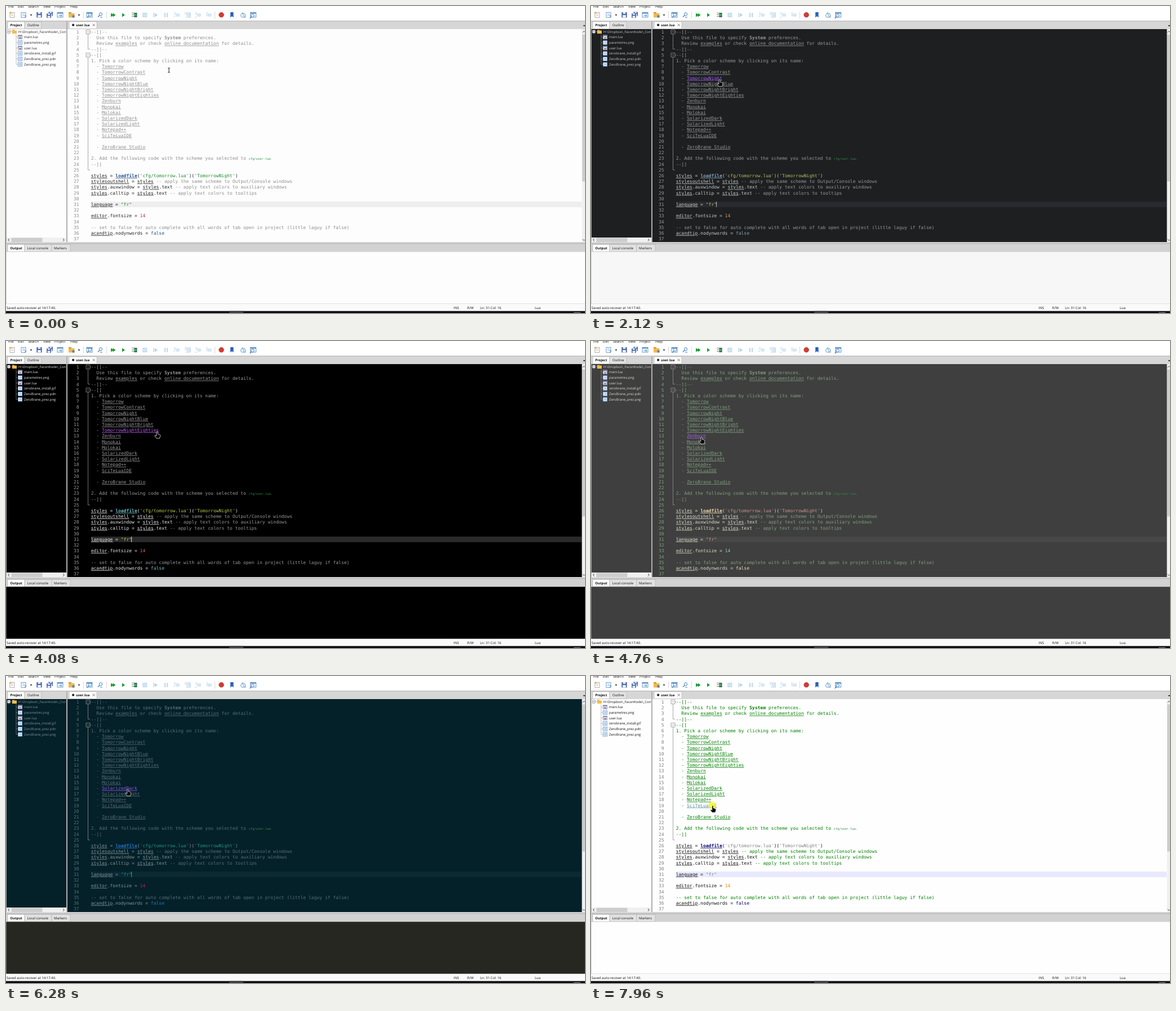
Animation of 1027x545 px, one loop 8000 ms. Source, as an HTML page:

```html
<!DOCTYPE html>
<html lang="en">
<head>
<meta charset="utf-8">
<title>Colour scheme picker</title>
<style>
  html, body { margin: 0; width: 100%; height: 100%; overflow: hidden; background: #fff; }
  svg { display: block; width: 1027px; height: 545px; }
  text { white-space: pre; text-rendering: geometricPrecision; }
  .ui text { font: 6px "Open Sans", "Noto Sans", sans-serif; fill: #111; }
  .ui .bold { font-weight: 700; }
  .pane { fill: var(--bg); }
  #editor text { font: 8.02px "DejaVu Sans Mono", "Noto Sans Mono", monospace; fill: var(--fg); }
  #editor .num { text-anchor: end; fill: var(--num); }
  #editor .com { fill: var(--comment); }
  .com .bold, .kw { font-weight: 700; }
  .link, .var, .kw { text-decoration: underline; text-decoration-thickness: .7px; }
  .kw, .bool { fill: var(--keyword); }
  .str { fill: var(--string); }
  .digit { fill: var(--number); }
  .small { font-size: 5.37px; }
  .path { fill: #2f8f3f; }
  #editor .link.hover { fill: var(--hover); }
  .current { fill: var(--line); }
  .fold { fill: none; stroke: #929292; stroke-width: .8; }
  #project text { fill: var(--fg); }
  #hand { fill: #000; stroke: #fff; stroke-width: .7; stroke-linejoin: round; }
  #beam { fill: none; stroke-width: .9; }
</style>
</head>
<body>
<svg viewBox="0 0 1027 545">
  <defs>
    <clipPath id="side"><rect x="1" y="41" width="106" height="370"/></clipPath>
  </defs>
  <rect width="1027" height="545" fill="#fff"/>
  <g id="chrome" class="ui"></g>
  <g id="project" class="ui"></g>
  <g id="editor"></g>
  <g id="output"><rect class="pane" x=".5" y="436.4" width="1026.5" height="92.1"/></g>
  <g id="bars"></g>
  <g id="pointer">
    <circle id="press" r="6.6" fill="#ff0" opacity=".68"/>
    <path id="hand" transform="translate(.9 .6)" d="M-1.2 .6Q0-.7 1.1.6V4.4L2.5 4.7 4.2 5.2 5.6 6.2V9.1L4.4 12.2H-1.1L-4 8.2Q-4.2 6.7-2.7 7L-1.2 8.1Z"/>
    <path id="beam" d="M-1.8-4H-.4L0-3.5.4-4H1.8M0-3.5V3.5M-1.8 4H-.4L0 3.5.4 4H1.8"/>
  </g>
</svg>
<script>
const LOOP = 8000, LEFT = 150.7, CHAR = 4.828, ROW = 10.2;
const $ = id => document.getElementById(id);
const baseline = row => 49 + (row - 1) * ROW;
const rect = (x, y, w, h, fill, more = '') => `<rect x="${x}" y="${y}" width="${w}" height="${h}" fill="${fill}" ${more}/>`;
const path = (d, stroke, fill = 'none', width = 1) => `<path d="${d}" stroke="${stroke}" fill="${fill}" stroke-width="${width}"/>`;
const text = (x, y, s, cls = '') => `<text x="${x}" y="${y}" class="${cls}">${s}</text>`;
const span = (cls, s) => `<tspan class="${cls}">${s}</tspan>`;

// bg, current line, foreground, comment, keyword, string, number, hovered link, line numbers
const fields = ['bg', 'line', 'fg', 'comment', 'keyword', 'string', 'number', 'hover', 'num'];
const schemes = {
  tomorrow: 'fdfdfd eeeeee 242424 8e908c 27518c 1e8c2c c82848 c080f8',
  contrast: 'f7f7f7 ebebeb 161616 8e908c 1f2f70 007f20 3a50c8 c080f8',
  night: '1d1f21 282a2e c5c8c6 969896 81a2be b5bd68 de935f a060f0',
  blue: '002451 003b76 ffffff 7285b7 bbeaff d1f1a9 ffc58f 704cf0',
  bright: '000000 2a2a2a eaeaea 969896 70c0c8 b9ca4a e0604f b65cf0',
  eighties: '2d2d2d 393939 cccccc 999999 99cccc 99cc99 f99157 b060f0',
  zenburn: '3f3f3f 484848 dcdccc 7f9f7f f0dfaf cc9393 8cd0d3 b060f0',
  monokai: '272822 2f302a f8f8f2 75715e 66d9ef e6db74 ae81ff a650d0',
  molokai: '262721 2f302a f8f8f2 7e8e91 66d9ef e6db74 ae81ff a650d0',
  solarDark: '042029 0a2933 839496 586e75 2176c7 259286 c61c6f 9050e0',
  solarLight: 'fdf5e0 ece5d2 465a61 8a9a98 24363c 259286 c61c6f c080f0',
  plain: 'fefefe e8e8ff 101010 008000 000070 808080 ff8000 5f8f9f 808080'
};
const switches = [
  [0, 'tomorrow'], [1000, 'contrast'], [2100, 'night'], [2830, 'blue'], [3380, 'bright'],
  [4160, 'eighties'], [4680, 'zenburn'], [5180, 'monokai'], [5735, 'molokai'],
  [6260, 'solarDark'], [6775, 'solarLight'], [7340, 'plain'], [8020, 'plain']
];
const panes = [['editor', 0], ['project', 20], ['output', 60]];
const moves = [
  [40, 289, 114], [340, 387, 136], [820, 243, 121], [1060, 243, 121], [1360, 245, 122],
  [1720, 227, 130], [2100, 227, 130], [2560, 249, 139], [2760, 250, 139], [2840, 253, 140],
  [3240, 255, 149], [3400, 255, 149], [3680, 277, 159], [3840, 267, 160], [4160, 267, 160],
  [4580, 195, 169], [4700, 195, 169], [5040, 197, 179], [5200, 197, 179], [5560, 193, 191],
  [5735, 193, 191], [6000, 215, 200], [6260, 215, 200], [6560, 227, 211], [6840, 227, 211],
  [7120, 205, 220], [7340, 205, 220], [7680, 215, 229.5]
];
const caretOn = [[130, 660], [1190, 1720], [2100, 2630], [3310, 3840], [4060, 4590],
  [5180, 5730], [5740, 6000], [6240, 6500], [6760, 7100], [7320, 7660]];

// _link_  *bold*  ~path~
const notes = `--[[--
  Use this file to specify *System* preferences.
  Review _examples_ or check _online documentation_ for details.
--]]--
--[[
1. Pick a color scheme by clicking on its name:
  - _Tomorrow_
  - _TomorrowContrast_
  - _TomorrowNight_
  - _TomorrowNightBlue_
  - _TomorrowNightBright_
  - _TomorrowNightEighties_
  - _Zenburn_
  - _Monokai_
  - _Molokai_
  - _SolarizedDark_
  - _SolarizedLight_
  - _Notepad++_
  - _SciTeLuaIDE_

  - _ZeroBrane Studio_

2. Add the following code with the scheme you selected to ~cfg/user.lua~
--]]
`.split('\n');
const code = `styles = loadfile('cfg/tomorrow.lua')('TomorrowNight')
stylesoutshell = styles -- apply the same scheme to Output/Console windows
styles.auxwindow = styles.text -- apply text colors to auxiliary windows
styles.calltip = styles.text -- apply text colors to tooltips

language = "fr"

editor.fontsize = 14

-- set to false for auto complete with all words of tab open in project (little laguy if false)
acandtip.nodynwords = false
`.split('\n');

const markNote = s => s
  .replace(/_([^_]+)_/g, (_, t) => span('link', t))
  .replace(/\*(.+)\*/, (_, t) => span('bold', t))
  .replace(/~(.+)~/, (_, t) => span('small path', t) + span('small', '.'));
const tokenClasses = ['com', 'str', 'kw', 'var', 'digit', 'bool'];
const markCode = s => s.replace(
  /(--.*)|('[^']*'|"[^"]*")|(loadfile)|\b(styles\w*|language|editor|acandtip)\b|(\d+)|(false)/g,
  (all, ...groups) => span(tokenClasses[groups.slice(0, 6).findIndex(Boolean)], all));

function drawEditor() {
  let out = '<rect class="pane" x="109" y="41" width="913" height="378"/>'
    + '<rect class="current" x="151" y="347.2" width="870" height="10"/>';
  [...notes, ...code].forEach((line, i) => {
    const y = baseline(i + 1).toFixed(2), isNote = i < notes.length;
    out += text(129.6, y, i + 1, 'num');
    if (line) out += text(LEFT, y, isNote ? markNote(line) : markCode(line), isNote ? 'com' : '');
  });
  const box = y => `M142 ${y - 3.5}h7v7h-7zM143.5 ${y}h4`;
  out += `<path class="fold" d="${box(46)}${box(87)}M145.5 49.5V76.5H149M145.5 90.5V291H149M149 46h2M149 87h2"/>`;
  out += '<rect id="caret" x="222.2" y="347.3" width=".9" height="9.8" style="fill:var(--fg)"/>';
  $('editor').innerHTML = out;
}

function drawProject() {
  const files = ['main.lua', 'parametres.png', 'user.lua', 'zerobrane_install.gif', 'ZeroBrane_prez.pdn', 'ZeroBrane_prez.png'];
  let out = '<rect class="pane" x="1" y="41" width="106" height="370"/><g clip-path="url(#side)">';
  out += path('M5 48V50M8 45.5h3M18 50V103.5', '#999', 'none', .6) + rect(2.5, 43, 5, 5, '#fff', 'stroke="#888" stroke-width=".7"');
  out += path('M3.7 45.5h2.6', '#333', 'none', .7);
  out += rect(11, 42.5, 4, 2, '#d99a2b') + rect(11, 43.5, 8, 5.5, '#f3bd4d');
  out += text(22, 47.7, 'H:\\Dropbox\\_FaconKode\\_Conf');
  files.forEach((name, i) => {
    const y = 55.2 + i * 9.68, lua = name.endsWith('.lua');
    out += path(`M18 ${y}h3`, '#999', 'none', .6) + rect(21.5, y - 3.4, 7.2, 6.8, '#fff', `stroke="${lua ? '#8a8a92' : '#5f96d2'}" stroke-width=".8"`);
    out += lua ? rect(22, y - 3, 6.2, 1.8, '#6a88c8') + rect(23, y + .4, 4.4, 1.8, '#80507c')
      : path(`M23 ${y - 1.5}h4.4M23 ${y}h4.4M23 ${y + 1.5}h4.4`, '#5f96d2', 'none', .7);
    out += text(32, y + 2.1, name);
  });
  $('project').innerHTML = out + '</g>';
}

function drawToolbar() {
  const blue = '#4a86bf', pale = '#b4d2e9', green = '#169a35';
  const page = (x, c) => rect(x - 4, 11.3, 8, 9, '#fff', `stroke="${c}" stroke-width=".8"`) + path(`M${x - 2} 14h4M${x - 2} 16.5h4`, c, 'none', .6);
  const disk = (x, y, s) => rect(x - s, y - s, 2 * s, 2 * s, '#4a68b0') + rect(x - s / 2, y - s, s, s * .65, '#dce8f8') + rect(x - s * .6, y + s * .1, s * 1.2, s * .8, '#fff');
  const frame = (x, c) => rect(x - 5, 11.5, 10, 8.5, '#f2f8fd', `stroke="${c}" stroke-width=".8"`) + path(`M${x - 5} 12.7h10`, c, 'none', 1.4);
  const lens = (x, y) => `<circle cx="${x}" cy="${y}" r="2.7" fill="#eef6ff" stroke="${blue}"/>` + path(`M${x - 2} ${y + 2}l-3 3`, blue, 'none', 1.4);
  const play = (x, c) => path(`M${x - 2} 12.5l5 3.5-5 3.5z`, 'none', c);
  const drop = x => path(`M${x - 2} 15h4l-2 2.5z`, 'none', '#222');
  const step = (x, d) => path(`M${x - 5} 12h3M${x - 5} 14.5h3${d}`, pale, 'none', 1.1) + rect(x - 1, 14, 5, 4, '#e0eef8', `stroke="${pale}" stroke-width=".8"`);
  let out = page(11, '#999') + path('M6 12h4M8 10v4', '#eab63b', 'none', 1.3);
  out += page(31, blue) + path('M33 16l3 2-3 2', blue) + drop(44.5) + disk(59, 15.7, 4.7) + disk(79.3, 14, 3.7) + disk(76, 17.2, 3.9);
  out += frame(96, blue) + path('M94 17h5l-2-2m2 2l-2 2', blue);
  out += rect(111, 11, 5, 3, '#d4942c') + rect(111, 13, 10.5, 7.5, '#f2b84b') + rect(117.5, 16.5, 4, 4, blue) + drop(129.5);
  out += frame(148, blue) + lens(149, 15.5) + lens(168, 14.5) + path('M167 20h4', blue);
  out += play(188, green) + play(191.5, green) + play(208, green) + path('M223 12.5h4M223 15.5h4M223 18.5h4', '#666', 'none', .8) + rect(227, 12, 5.5, 8, '#4c6070') + play(229, '#35bf55');
  out += rect(242.8, 12.5, 7, 7, '#d0e5f4', `stroke="${pale}" stroke-width=".8"`) + rect(261.5, 12.2, 1.4, 7.6, pale) + play(266, pale) + rect(281, 12.2, 1.8, 7.6, pale) + rect(285, 12.2, 1.8, 7.6, pale);
  out += step(303, 'M300 18h-3') + step(322, 'M319 20h8V12h-8') + step(341, 'M338 20h-3') + step(360, 'M355 17h4');
  out += '<circle cx="382" cy="15.7" r="4.3" fill="#d83a2e" stroke="#a92720" stroke-width=".7"/>' + path('M398 11h5.5v9.5l-2.7-2.5-2.8 2.5z', 'none', '#2b62bd');
  out += path('M416 17l3-5 5 2 1 6h-7zM419 12l4 8', blue, '#eef6fc', .8) + frame(438.5, blue) + lens(437.5, 17);
  out += path('M137.5 10v12M178.5 10v12M370.5 10v12', '#ccc', 'none', .8);
  return out;
}

function drawChrome() {
  const tab = (x, y, w, fill) => rect(x, y, w, 12.5, fill, 'stroke="#b4b4b4" stroke-width=".7"');
  let out = '';
  [[4, 'File'], [21, 'Edit'], [39, 'Search'], [66, 'View'], [86, 'Project'], [114, 'Help']].forEach(([x, s]) => out += text(x, 2.8, s));
  out += drawToolbar() + rect(0, 26.5, 1027, 14.5, '#d6d6d6') + rect(0, 26.3, 1027, .8, '#aaa');
  out += tab(3, 28, 30, '#fff') + tab(33, 28, 30, '#e2e2e2') + tab(112, 28, 49, '#fff');
  out += text(7.4, 36, 'Project', 'bold') + text(38, 36, 'Outline') + text(116.5, 36, '✱', 'bold') + text(124, 36, 'user.lua', 'bold');
  out += path('M153.5 31.5l4.4 4.4m0-4.4l-4.4 4.4', '#555', 'none', .8) + path('M1023.5 34h4l-2 2.5z', 'none', '#222');
  out += rect(0, 40, 1, 380, '#aaa') + rect(107, 27, 2, 392, '#b0b0b0') + rect(0, 419, 1027, 18, '#d2d2d2');
  out += rect(0, 421.5, 1027, .8, '#aaa') + rect(0, 436, 1027, 1, '#bbb') + rect(0, 437, 1, 92, '#aaa');
  out += tab(3, 423.5, 30, '#fff') + tab(33, 423.5, 48, '#e2e2e2') + tab(81, 423.5, 33, '#e2e2e2');
  out += text(7.3, 431.6, 'Output', 'bold') + text(37.5, 431.6, 'Local console') + text(85, 431.6, 'Markers');
  out += rect(0, 528, 1027, 13.5, '#fafafa') + rect(0, 528, 1027, .8, '#bbb');
  [[1, 'Saved auto-recover at 14:17:40.'], [794, 'INS'], [818, 'R/W'], [841, 'Ln: 31 Col: 16'], [938, 'Lua']].forEach(([x, s]) => out += text(x, 537.8, s));
  out += rect(0, 541.5, 1027, 3.5, '#0b0d12') + rect(396, 541.5, 25, 3.5, '#3a3d42') + rect(1007, 543.8, 12, 1.2, '#777');
  $('chrome').innerHTML = out;

  $('bars').innerHTML = rect(1, 411, 106, 8.5, '#f0f0f0') + rect(9.5, 411.5, 55, 7.5, '#cdcdcd')
    + path('M6 413l-2.3 2.3 2.3 2.3M101 413l2.3 2.3-2.3 2.3', '#333')
    + rect(1021.5, 41, 5.5, 378, '#f0f0f0') + rect(1022, 50.5, 5, 261, '#cdcdcd')
    + path('M1022.7 47l2.5-2.4 2.5 2.4M1022.7 414l2.5 2.4 2.5-2.4', '#444');
}

function applyScheme(id, name) {
  const pane = $(id);
  if (pane.dataset.scheme === name) return;
  pane.dataset.scheme = name;
  const colors = schemes[name].split(' ');
  fields.forEach((field, i) => pane.style.setProperty('--' + field, '#' + (colors[i] || colors[3])));
}

function pointerAt(t) {
  const i = moves.findIndex(m => m[0] > t);
  if (i < 1) return (i ? moves.at(-1) : moves[0]).slice(1);
  const [a, b] = [moves[i - 1], moves[i]];
  const k = (t - a[0]) / (b[0] - a[0]), ease = k * k * (3 - 2 * k);
  return [1, 2].map(n => a[n] + (b[n] - a[n]) * ease);
}

drawChrome();
drawProject();
drawEditor();

const links = [...document.querySelectorAll('#editor text.com')]
  .filter(el => el.textContent.startsWith('  - '))
  .map(el => ({
    el: el.querySelector('.link'),
    row: Math.round((el.getAttribute('y') - 49) / ROW) + 1,
    end: LEFT + el.textContent.length * CHAR
  }));

function render(t) {
  for (const [id, lag] of panes)
    applyScheme(id, switches.findLast(([at]) => t >= (at && at + lag))[1]);

  const [x, y] = pointerAt(t);
  const row = Math.round((y - 46.2) / ROW) + 1;
  const over = links.find(l => l.row === row && x > 168 && x < l.end + 2);
  const isHand = over && x <= over.end;
  links.forEach(l => l.el.classList.toggle('hover', l === over));
  $('pointer').setAttribute('transform', `translate(${x.toFixed(2)} ${y.toFixed(2)})`);
  $('hand').style.display = isHand ? '' : 'none';
  $('beam').style.display = isHand ? 'none' : '';
  const isDark = parseInt(schemes[$('editor').dataset.scheme].slice(0, 2), 16) < 128;
  $('beam').style.stroke = isDark ? '#fff' : '#000';
  $('press').style.display = switches.some(([at]) => t >= at - 60 && t < at) ? '' : 'none';
  $('caret').style.display = caretOn.some(([on, off]) => t >= on && t < off) ? '' : 'none';
}

const start = performance.now();
(function tick() {
  render((performance.now() - start) % LOOP);
  requestAnimationFrame(tick);
})();
</script>
</body>
</html>
```
